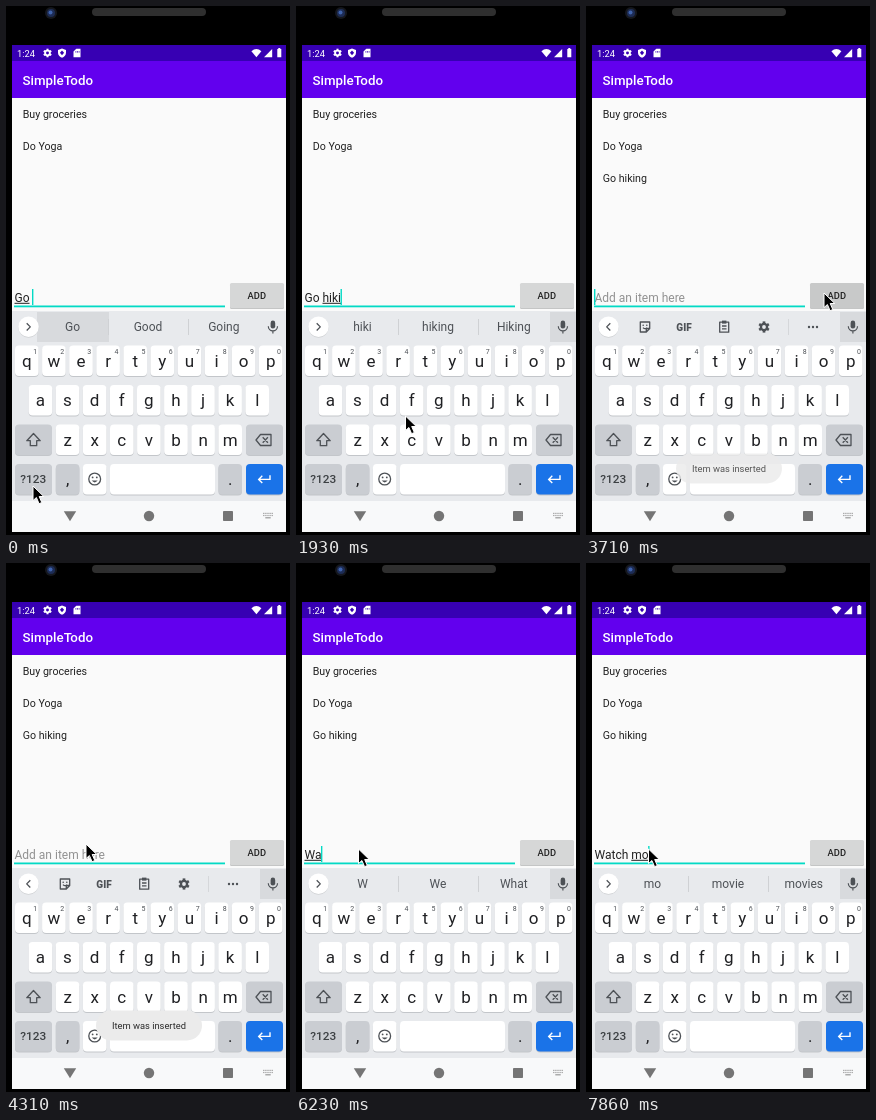
Recreate the animation shown at these times as an HTML page. Size 284 by 529 pixels, loop 8 s.

```html
<!DOCTYPE html>
<html lang="en">
<head>
<meta charset="utf-8">
<title>Todo list</title>
<style>
html, body { margin: 0; width: 100%; height: 100%; overflow: hidden; background: #000; }
svg { display: block; width: 284px; height: 529px; font-family: Roboto, sans-serif; }
.mid { text-anchor: middle; }
.med { font-weight: 500; }
.ico { fill: none; stroke: #4d5156; stroke-width: 1.3; stroke-linejoin: round; }
</style>
</head>
<body>
<svg id="stage" viewBox="0 0 284 529"></svg>
<script>
const LOOP = 8000;
const stage = document.getElementById('stage');

const rect = (x, y, w, h, fill, r = 0, more = '') =>
  `<rect x="${x}" y="${y}" width="${w}" height="${h}" rx="${r}" fill="${fill}" ${more}/>`;
const circle = (x, y, r, fill, more = '') =>
  `<circle cx="${x}" cy="${y}" r="${r}" fill="${fill}" ${more}/>`;
const path = (d, more = 'class="ico"') => `<path d="${d}" ${more}/>`;
const text = (x, y, size, str, fill, more = '') =>
  `<text x="${x}" y="${y}" font-size="${size}" fill="${fill}" ${more}>${str}</text>`;
const group = (body, more = '') => `<g ${more}>${body}</g>`;

function gear(x, y, r, color) {
  let teeth = '';
  for (let i = 0; i < 6; i++) {
    teeth += rect(x - r * .24, y - r, r * .48, r * .5, color, 0, `transform="rotate(${i * 60} ${x} ${y})"`);
  }
  return teeth + circle(x, y, r * .55, 'none', `stroke="${color}" stroke-width="${r * .42}"`);
}

function phone() {
  return rect(0, 0, 284, 529, '#000')
    + circle(45, 7, 6, '#15171c') + circle(45, 7, 4, '#1d2c55') + circle(44.5, 6.5, 2, '#3f63ad')
    + rect(86, 2, 114, 8, '#2f2f2f', 4)
    + rect(6, 39, 274, 487, '#fafafa');
}

function statusBar() {
  const white = 'fill="#fff"';
  return rect(6, 39, 274, 16, '#3700b3')
    + text(11, 50.6, 9.33, '1:24', '#fff')
    + gear(41.5, 47, 4.3, '#fff')
    + path('M56 42.4l4 1.5v2.8c0 2.4-1.7 4.1-4 5-2.3-.9-4-2.6-4-5v-2.8z', white)
    + path('M56 44.4l2.1 2.3-2.1 2.6-2.1-2.6z', 'fill="#3700b3"')
    + path('M70.3 42.8h4.2v8.4h-7v-5.6z', white)
    + path('M69.9 45v1.7M71.5 45v1.7M73.1 45v1.7', 'stroke="#3700b3" stroke-width=".7"')
    + path('M245.4 45.2q5-4.2 10 0l-5 6z', white)
    + path('M266.2 43v8.2h-8.2z', white)
    + path('M271.3 43h1v-.9h2v.9h1v8.3h-4z', white);
}

function appBar() {
  return rect(6, 55, 274, 37, '#6200ee')
    + text(16.5, 78.7, 13.33, 'SimpleTodo', '#fff', 'class="med"');
}

function key(x, y, w, fill = '#fff') {
  return rect(x, y + 1, w, 30.5, '#c3c6ca', 4) + rect(x, y, w, 30.5, fill, 4);
}

function letters(row, x0, y, digits) {
  return [...row].map((ch, i) => {
    const x = x0 + i * 27.1;
    return key(x - 11.8, y, 23.6)
      + text(x, y + 21.3, 17, ch, '#202124', 'class="mid"')
      + (digits ? text(x + 8.3, y + 8, 7, (i + 1) % 10, '#4d5156', 'class="mid"') : '');
  }).join('');
}

function keyboard() {
  const gray = '#cacdd2';
  return rect(6, 305, 274, 190, '#e8eaed')
    + letters('qwertyuiop', 20.8, 339.5, true)
    + letters('asdfghjkl', 34.4, 379, false)
    + letters('zxcvbnm', 61.6, 418.5, false)
    + key(9, 418.5, 37, gray) + path('M27.5 427.5l6.7 7.2h-3.5v5h-6.4v-5h-3.5z')
    + key(240, 418.5, 37, gray)
    + path('M254.5 428.5h10.5v11h-10.5l-4.5-5.5zM256.7 431.3l5.2 5.4M261.9 431.3l-5.2 5.4')
    + key(9, 458, 37, gray) + text(27.3, 477.3, 11.8, '?123', '#3c4043', 'class="mid med"')
    + key(49.8, 458, 23.6, gray) + text(61.6, 479, 17, ',', '#202124', 'class="mid"')
    + key(76.9, 458, 23.6) + circle(88.7, 473, 5.9, 'none', 'class="ico"')
    + circle(86.6, 471.4, .9, '#4d5156') + circle(90.8, 471.4, .9, '#4d5156')
    + path('M85.7 474.6q3 3.6 6 0z', 'fill="#4d5156"')
    + key(104, 458, 105)
    + key(212.4, 458, 23.6, gray) + text(224.2, 479, 17, '.', '#202124', 'class="mid"')
    + key(240, 458, 37, '#1a73e8')
    + path('M264 469.2v4.2h-11M256.3 469.8l-3.6 3.6 3.6 3.6', 'fill="none" stroke="#fff" stroke-width="1.4"');
}

function navBar() {
  let dots = '';
  for (let r = 0; r < 2; r++) {
    for (let c = 0; c < 5; c++) dots += rect(257.2 + c * 2.1, 506.8 + r * 2.1, 1.2, 1.2, '#9a9a9a');
  }
  return rect(6, 495, 274, 31, '#f8f9fa')
    + path('M57.8 505.2h12.4l-6.2 10z', 'fill="#757575"')
    + circle(143, 510, 5.2, '#757575')
    + rect(217, 505, 10, 10, '#757575', .8)
    + dots + rect(259.3, 511.2, 5.4, 1.2, '#9a9a9a');
}

function mic() {
  return rect(264.6, 314.6, 4.6, 8, '#4d5156', 2.3)
    + path('M262.3 320.2a4.6 4.6 0 0 0 9.2 0M266.9 324.8v2.8', 'fill="none" stroke="#4d5156" stroke-width="1.2"');
}

function tools() {
  return path('M54.3 316h9.4v6.5l-3.4 3.5h-6zM60.3 326v-3.5h3.4M57 321.6q2 2.2 4 0')
    + circle(57.2, 319.2, .8, '#4d5156') + circle(60.8, 319.2, .8, '#4d5156')
    + text(98, 324.7, 10, 'GIF', '#4d5156', 'class="mid" font-weight="900"')
    + path('M133.7 316.2h9v10h-9zM136 320h4.5M136 322.8h4.5')
    + rect(136, 314.6, 4.4, 3, '#4d5156')
    + gear(178, 321, 5.6, '#4d5156')
    + rect(202, 313, 1, 16, '#d5d7da')
    + [223, 227, 231].map(x => circle(x, 321, 1.2, '#4d5156')).join('');
}

const words = [66.5, 142, 217.8];
stage.innerHTML = phone() + statusBar() + appBar()
  + text(16.7, 112.3, 10.67, 'Buy groceries', '#212121')
  + text(16.7, 144.3, 10.67, 'Do Yoga', '#212121')
  + text(16.7, 176.3, 10.67, 'Go hiking', '#212121', 'id="item"')
  + rect(8, 299.5, 211, 1.8, '#03dac5')
  + text(8.5, 295.5, 12, 'Add an item here', '#929292', 'id="hint"')
  + text(8.5, 295.5, 12, '', '#212121', 'id="entry"')
  + rect(0, 296.8, 0, 1, '#212121', 0, 'id="under"')
  + rect(0, 283, 1.4, 16, '#03dac5', 0, 'id="caret"')
  + rect(224, 278, 54, 25, '#c4c5c5', 1.5) + rect(224, 277, 54, 25, '#d6d7d7', 1.5, 'id="add"')
  + text(250.8, 293, 9.33, 'ADD', '#212121', 'class="mid med"')
  + keyboard()
  + rect(31, 306, 72, 30, '#d8dadd', 0, 'id="press"')
  + rect(254, 306, 26, 30, '#d8dadd', 0, 'id="micBox"') + mic()
  + circle(22.5, 321.5, 10.2, '#d0d2d5') + circle(22.5, 320.8, 10.2, '#fff')
  + path('M20.7 317.3l3.6 3.6-3.6 3.6', 'id="chevron" class="ico"')
  + group(rect(102, 313, 1, 16, '#cfd1d4') + rect(182, 313, 1, 16, '#cfd1d4')
    + words.map(x => text(x, 325.3, 12, '', '#4d5156', 'class="mid word"')).join(''), 'id="words"')
  + group(tools(), 'id="tools"')
  + navBar()
  + group(rect(90, 447.5, 106, 30, '#ebebeb', 15)
    + text(143, 465.8, 9.33, 'Item was inserted', '#2b2b2b', 'class="mid"'), 'id="toast"')
  + path('M0 0v14.6l3.4-3.1 2.7 6.2 2.7-1.2-2.6-6h4.6z',
    'id="mouse" fill="#000" stroke="#fff" stroke-width="1" stroke-linejoin="round"');

const el = {};
stage.querySelectorAll('[id]').forEach(n => el[n.id] = n);
const slots = [...stage.querySelectorAll('.word')];

// time, entry, underlined part (start, end), suggestions
const typing = [
  [0, 'Go ', 0, 2, 'Go Good Going'],
  [300, 'Go ', 0, 0, 'to for home'],
  [740, 'Go h', 3, 4, 'to for home'],
  [890, 'Go hi', 3, 5, 'h he home'],
  [1040, 'Go hi', 3, 5, 'hi hiking home'],
  [1190, 'Go hik', 3, 6, 'hik hiking Hiking'],
  [1340, 'Go hiki', 3, 7, 'hiki hiking Hiking'],
  [2530, 'Go hiking', 0, 0, 'with on and'],
  [3560, '', 0, 0, ''],
  [5650, 'W', 0, 1, ''],
  [5940, 'W', 0, 1, 'W We What'],
  [6230, 'Wa', 0, 2, 'W We What'],
  [6380, 'Wa', 0, 2, 'Wa Was Watch'],
  [6820, 'Wat', 0, 3, 'Wat Watch Water'],
  [6970, 'Watc', 0, 4, 'Watc Watch Watching'],
  [7110, 'Watch', 0, 5, 'Watch Watched Watching'],
  [7410, 'Watch ', 0, 0, 'the out for'],
  [7560, 'Watch m', 6, 7, 'm my me'],
  [7860, 'Watch mo', 6, 8, 'mo movie movies']
];
const mouse = [
  [0, 27, 480], [1640, 45, 467], [1790, 78, 440], [1930, 109.5, 410], [2080, 122, 358], [2230, 130, 314],
  [2830, 186, 297], [2970, 229.5, 283], [3120, 237, 286], [3270, 238, 287],
  [4010, 222, 286], [4160, 152, 283], [4310, 80, 281], [4460, 64, 286], [4610, 62.5, 286]
];
const caret = [[0, 1], [2830, 0], [3270, 1], [4010, 0], [4460, 1], [5050, 0], [5500, 1]];
const toast = [[0, 0], [3560, .35], [3710, .8], [3860, 1], [5500, .6], [5650, .25], [5800, 0]];

const at = (steps, t) => steps.findLast(s => s[0] <= t);
const show = (node, on) => node.style.display = on ? '' : 'none';
const pen = document.createElement('canvas').getContext('2d');
const width = s => {
  pen.font = '120px Roboto, sans-serif';
  return pen.measureText(s).width / 10;
};

function draw(t) {
  const [, entry, from, to, list] = at(typing, t);
  const [, mx, my] = at(mouse, t);
  el.entry.textContent = entry;
  show(el.hint, !entry);
  el.under.setAttribute('x', 8.5 + width(entry.slice(0, from)));
  el.under.setAttribute('width', width(entry.slice(from, to)));
  el.caret.setAttribute('x', 8 + width(entry));
  show(el.caret, at(caret, t)[1]);
  show(el.item, t >= 3560);
  show(el.press, t < 300);
  show(el.micBox, t >= 300);
  show(el.words, list);
  show(el.tools, !list);
  el.chevron.setAttribute('transform', list ? '' : 'matrix(-1 0 0 1 45 0)');
  list.split(' ').forEach((w, i) => slots[i].textContent = w);
  el.add.setAttribute('fill', t >= 3560 && t < 3860 ? '#c8c9c9' : '#d6d7d7');
  el.toast.setAttribute('opacity', at(toast, t)[1]);
  el.mouse.setAttribute('transform', `translate(${mx} ${my})`);
}

const start = performance.now();
function tick() {
  draw((performance.now() - start) % LOOP);
  requestAnimationFrame(tick);
}
tick();
</script>
</body>
</html>
```
